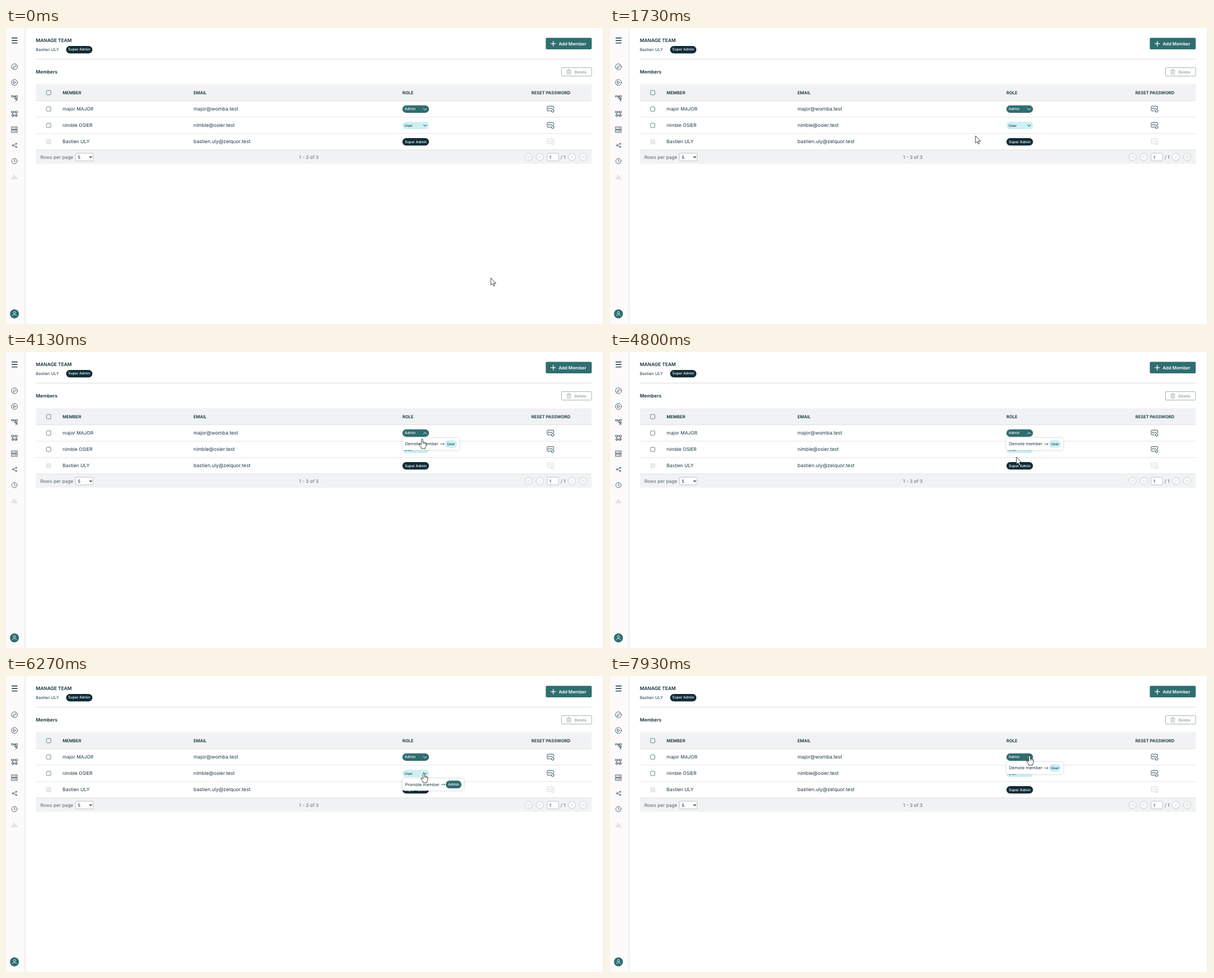
Recreate the animation shown at these times as an HTML page. Size 1062x527 px, loop 8 s.

```html
<!DOCTYPE html>
<html lang="en">
<head>
<meta charset="utf-8">
<title>Manage team</title>
<style>
  html, body { margin: 0; width: 100%; height: 100%; overflow: hidden; background: #fff; }
  svg { display: block; width: 1062px; height: 527px; }
  text { font: 400 8.4px Inter, "Open Sans", sans-serif; fill: #1d3943; text-rendering: geometricPrecision; }
  .head { font-size: 7.55px; font-weight: 600; fill: #102d37; }
  .title { font-size: 8.4px; font-weight: 600; fill: #102d37; }
  .small { font-size: 7.2px; }
  .mail { font-size: 8.7px; }
  .tag { font-size: 6.3px; font-weight: 500; }
  .item { font-size: 7.5px; }
  .foot { font-size: 8.25px; fill: #566469; }
  .white { fill: #fff; }
  .mid { text-anchor: middle; }
  .line { fill: none; stroke: #1b3a43; stroke-width: .75; stroke-linecap: round; stroke-linejoin: round; }
  .panel { fill: #fff; filter: drop-shadow(0 .5px 1.5px rgba(0, 0, 0, .25)); }
  .teal { fill: #2f6e70; }
  .dark { fill: #102d37; }
  .sky { fill: #cdf0f4; }
</style>
</head>
<body>
<svg viewBox="0 0 1062 527">
  <defs>
    <g id="reset" class="line" style="stroke-width:.9">
      <path d="M-1 3.6H-4.6Q-5.8 3.6-5.8 2.4V-3.6Q-5.8-4.8-4.6-4.8H4.4Q5.6-4.8 5.6-3.6V-.2"/>
      <path d="M-3.6-1.6l1.8 1.8m0-1.8l-1.8 1.8M0-1.6l1.8 1.8m0-1.8l-1.8 1.8"/>
      <path d="M.8 2.8Q1.4 6.2 4 6Q6.4 5.8 6.2 2.4L3.6 1.6V-.2M.8 2.8L2.4 3.6"/>
    </g>
    <path id="chev" d="M-2.7-1.4L0 1.4L2.7-1.4" fill="none" stroke-width="1" stroke-linecap="round" stroke-linejoin="round"/>
    <path id="go" class="line" d="M0 0H6.5M5-1.4L6.5 0L5 1.4"/>
  </defs>

  <rect width="34" height="527" fill="#fcfafb"/>
  <path d="M34 0V527" stroke="#dfe1e2"/>
  <path d="M1061.4 0V527" stroke="#dbe3e3"/>
  <path d="M10 17.8H20.5M10 22.2H20.5M10 26.6H20.5" stroke="#14323b" stroke-width="1.4"/>

  <g class="line">
    <g transform="translate(15 69)"><circle r="5.3"/><path d="M-2.4 2.5l.5-2L1.5-2.7 2.8-1.4-.5 2z"/></g>
    <g transform="translate(15 97)"><circle r="5.3"/><path d="M-1.5-2.4L2.4 0L-1.5 2.4z"/></g>
    <g transform="translate(15 125)"><path d="M-5-4.6h3.4v2.4H-5zM2-4.6h3.4v2.4H2zM-1.6-3.4H2M.2-3.4V.6H2M2-.4h3.2v2H2zM3.6 1.6L2.4 5M3.6 1.6L5 4.6"/></g>
    <g transform="translate(15 153)"><path d="M-5-4.8h3.4v2.8H-5zM1.8-4.8h3.4v2.8H1.8zM-1.6-3.4H1.8M-3.3-2V0M3.5-2V0"/><circle cx="-2.8" cy="2.7" r="2.1"/><circle cx="-2.8" cy="2.7" r=".5"/><circle cx="2.8" cy="2.7" r="2.1"/><circle cx="2.8" cy="2.7" r=".5"/></g>
    <g transform="translate(15 181)"><path d="M-5-5H5V-.6H-5zM-5 .6H5V5H-5zM-3.2-2.8h1M-3.2 2.8h1M0-2.8h3.2M0 2.8h3.2"/></g>
    <g transform="translate(15 209)"><path d="M-1.5-.7L2.2-2.6M-1.5.7L2.2 2.6"/><circle cx="-2.7" r="1.2"/><circle cx="3.1" cy="-2.9" r="1"/><circle cx="3.1" cy="2.9" r="1"/></g>
    <g transform="translate(15 237)"><circle r="4.7"/><path d="M0-3V.3L2 1.5"/></g>
    <path d="M11 266V269M13.7 261.5V269M16.4 264V269M19 266V269" stroke="#a3adb1"/>
  </g>
  <circle class="teal" cx="15" cy="509" r="8"/>
  <g fill="none" stroke="#fff" stroke-width=".8"><circle cx="15" cy="506.7" r="2"/><path d="M11.4 512.6Q11.6 510 15 510Q18.4 510 18.6 512.6"/></g>

  <text class="title" x="53" y="25.4">MANAGE TEAM</text>
  <text class="small" x="53" y="41.2">Bastien ULY</text>
  <rect class="dark" x="106.7" y="32" width="46.8" height="13.2" rx="6.6"/>
  <text class="tag white mid" x="130" y="40.4">Super Admin</text>
  <path d="M53 55.4H1040" stroke="#cfd3d5" stroke-width=".8"/>
  <text class="title" x="53" y="81">Members</text>

  <rect class="teal" x="958.6" y="17.6" width="81.6" height="20.4" rx="2"/>
  <path d="M967.3 27.8h9.2M971.9 23.2v9.2" stroke="#fff" stroke-width="1.3"/>
  <text class="white" x="981.4" y="30.7" style="font-size:7.9px;font-weight:600">Add Member</text>
  <rect x="986.5" y="70.6" width="53.5" height="15" rx="1.5" fill="#fff" stroke="#9ba6a9" stroke-width=".9"/>
  <path class="line" d="M995.8 75.5h7.6M998.2 75.3v-1.4h2.8v1.4M996.5 75.6l.4 6.8h5.4l.4-6.8M998.6 77.5v3M1000.6 77.5v3" style="stroke:#97a3a6"/>
  <text x="1009.4" y="80.5" style="font-size:6.9px;font-weight:600;fill:#97a3a6">Delete</text>

  <rect x="53" y="100.3" width="987" height="29.3" fill="#f0f2f4"/>
  <rect x="53" y="217" width="987" height="24.6" fill="#f0f2f4"/>
  <path d="M53 129.6H1040M53 158.8H1040M53 187.9H1040M53 217H1040" stroke="#d3d7d9" stroke-width=".7"/>
  <text class="head" x="100.6" y="118">MEMBER</text>
  <text class="head" x="333" y="118">EMAIL</text>
  <text class="head" x="704" y="118">ROLE</text>
  <text class="head" x="933" y="118">RESET PASSWORD</text>
  <g fill="#fff" stroke="#45686d" stroke-width=".8">
    <rect x="71.9" y="111.2" width="7.8" height="7.8" rx="1.6" fill="#f0f2f4"/>
    <rect x="71.9" y="140.4" width="7.8" height="7.8" rx="1.6"/>
    <rect x="71.9" y="169.5" width="7.8" height="7.8" rx="1.6"/>
    <rect x="71.9" y="198.6" width="7.8" height="7.8" rx="1.6" fill="#ebeced" stroke="#d6d9da"/>
  </g>
  <text x="100.6" y="147.1">major MAJOR</text><text class="mail" x="333" y="147.1">major@womba.test</text>
  <text x="100.6" y="176.3">nimble OSIER</text><text class="mail" x="333" y="176.3">nimble@osier.test</text>
  <text x="100.6" y="205.3">Bastien ULY</text><text class="mail" x="333" y="205.3">bastien.uly@zelquor.test</text>
  <use href="#reset" x="967" y="144"/>
  <use href="#reset" x="967" y="173.1"/>
  <use href="#reset" x="967" y="202.2" opacity=".22"/>

  <rect class="teal" x="704" y="137.8" width="47.2" height="13.2" rx="6.6"/>
  <text class="tag white" x="708" y="146.4">Admin</text>
  <use id="chevA" href="#chev" stroke="#fff"/>
  <rect class="sky" x="704" y="166.9" width="47.2" height="13.2" rx="6.6"/>
  <text class="tag" x="708" y="175.5">User</text>
  <use id="chevU" href="#chev" stroke="#102d37"/>
  <rect class="dark" x="704" y="196" width="47.2" height="13.2" rx="6.6"/>
  <text class="tag white mid" x="727.6" y="204.6">Super Admin</text>

  <text class="foot" x="61" y="232.6">Rows per page</text>
  <g fill="#fff" stroke="#b0b8ba" stroke-width=".8">
    <rect x="123.3" y="223" width="31.4" height="13.6" rx="1.8"/>
    <rect x="961" y="223" width="20.6" height="13.6" rx="1.8"/>
  </g>
  <text x="127.4" y="232.5" style="font-size:7.6px;fill:#111">5</text>
  <path d="M148.4 228.6l2.1 2.2 2.1-2.2" fill="none" stroke="#111" stroke-width="1.2"/>
  <text x="965" y="232.5" style="font-size:7.6px;fill:#111">1</text>
  <text class="foot mid" x="537.8" y="232.6">1 - 3 of 3</text>
  <text class="foot" x="985" y="232.6">/ 1</text>
  <g fill="#f7f8f8" stroke="#c0c7c9" stroke-width=".8">
    <circle cx="928" cy="229.6" r="6.6"/><circle cx="948" cy="229.6" r="6.6"/>
    <circle cx="1005" cy="229.6" r="6.6"/><circle cx="1025" cy="229.6" r="6.6"/>
    <path fill="none" d="M927.7 228l-1.6 1.6 1.6 1.6M930.2 228l-1.6 1.6 1.6 1.6M948.7 228l-1.6 1.6 1.6 1.6M1004.4 228l1.6 1.6-1.6 1.6M1023 228l1.6 1.6-1.6 1.6M1025.5 228l1.6 1.6-1.6 1.6"/>
  </g>

  <g id="menuA">
    <rect class="panel" x="704" y="153" width="101" height="21.8" rx="2.5"/>
    <text class="item" x="708.7" y="166.3">Demote member</text>
    <use href="#go" x="771.3" y="163.9"/>
    <rect class="sky" x="779.8" y="157" width="21" height="13.8" rx="6.2"/>
    <text class="tag mid" x="790.3" y="166">User</text>
  </g>
  <g id="menuU">
    <rect class="panel" x="704" y="182.2" width="109" height="21.8" rx="2.5"/>
    <text class="item" x="708.7" y="195.6">Promote member</text>
    <use href="#go" x="773" y="193.2"/>
    <rect class="teal" x="781.2" y="186.3" width="27.6" height="13.8" rx="6.4"/>
    <text class="tag white mid" x="795" y="195.3">Admin</text>
  </g>

  <g id="cursor" fill="#fff" stroke="#111" stroke-width=".8" stroke-linejoin="round">
    <path id="arrow" d="M0 0V12.8L2.9 10.2L5 14.6L7 13.7L5 9.4H9.2Z"/>
    <g id="hand">
      <path d="M-1.4 9.6V1.3Q-1.3 0 0 0Q1.3 0 1.4 1.3V5.6Q2.3 4.7 3.4 6Q4.5 5.2 5.3 6.6Q6.9 6.2 7 8V11.6Q6.8 13.6 5.7 14.6V16.8H-1.5V15Q-3.2 13-5 9.9Q-5.4 8.7-4.2 8.4Q-2.8 8.3-1.4 10.4Z"/>
      <path fill="none" d="M1.4 5.6V8.6M3.4 6V8.8M5.3 6.6V9" stroke-width=".6"/>
    </g>
  </g>
</svg>
<script>
const LOOP = 8000, FPS = 15, FLIP = 267;
const $ = id => document.getElementById(id);

// from ms, to ms, control x, y, end x, y
const start = [861, 445];
const moves = [
  [0, 470, 640, 375, 418, 306],
  [670, 1400, 358, 225, 645, 193],
  [1530, 1730, 647, 193, 649, 192],
  [1870, 2400, 672, 190, 693, 184],
  [2600, 3070, 716, 166, 739, 143],
  [3070, 3400, 740, 143, 740, 143],
  [3730, 4130, 739, 149, 739, 155],
  [4130, 4470, 738, 160, 735, 163],
  [4670, 5070, 688, 215, 806, 240],
  [5200, 5330, 804, 240, 803, 240],
  [5450, 6130, 758, 236, 742, 173],
  [6330, 6870, 742, 185, 742, 196],
  [7000, 7600, 742, 165, 745, 142]
];
// spans during which each menu is open
const openA = [[3667, 5533], [7800, LOOP + FLIP]];
const openU = [[6267, 7733]];

const clamp = v => Math.min(1, Math.max(0, v));
const ease = v => v * v * (3 - 2 * v);
const isOpen = (spans, t) => spans.some(([a, b]) => t >= a - 1 && t < b - 1);
const flip = (spans, t) => spans.reduce((s, [a, b]) =>
  s + ease(clamp((t - a) / FLIP)) - ease(clamp((t - b) / FLIP)), 0);

function pointer(t) {
  let [x, y] = start;
  for (const [a, b, cx, cy, tx, ty] of moves) {
    if (t <= a) break;
    const k = ease(clamp((t - a) / (b - a))), j = 1 - k;
    x = j * j * x + 2 * j * k * cx + k * k * tx;
    y = j * j * y + 2 * j * k * cy + k * k * ty;
  }
  return [x, y];
}

const show = (id, on) => $(id).style.display = on ? "" : "none";
const turn = (id, y, f) => $(id).setAttribute("transform", `translate(744.2 ${y}) scale(1 ${1 - 2 * f})`);

function draw(t) {
  const [x, y] = pointer(t), a = isOpen(openA, t), u = isOpen(openU, t);
  const within = (top, bottom, right) => x >= 704 && x <= right && y >= top && y <= bottom;
  const hot = within(138, 151, 751) || within(167, 180, 751) ||
    a && within(153, 175, 805) || u && within(182, 204, 813);
  show("menuA", a);
  show("menuU", u);
  show("hand", hot);
  show("arrow", !hot);
  turn("chevA", 144.6, flip(openA, t));
  turn("chevU", 173.7, flip(openU, t));
  $("cursor").setAttribute("transform", `translate(${x} ${y})`);
}

const origin = performance.now();
function tick() {
  const t = (performance.now() - origin) % LOOP;
  draw(Math.floor((t + 4) * FPS / 1000) * 1000 / FPS % LOOP);
  requestAnimationFrame(tick);
}
draw(0);
tick();
</script>
</body>
</html>
```
